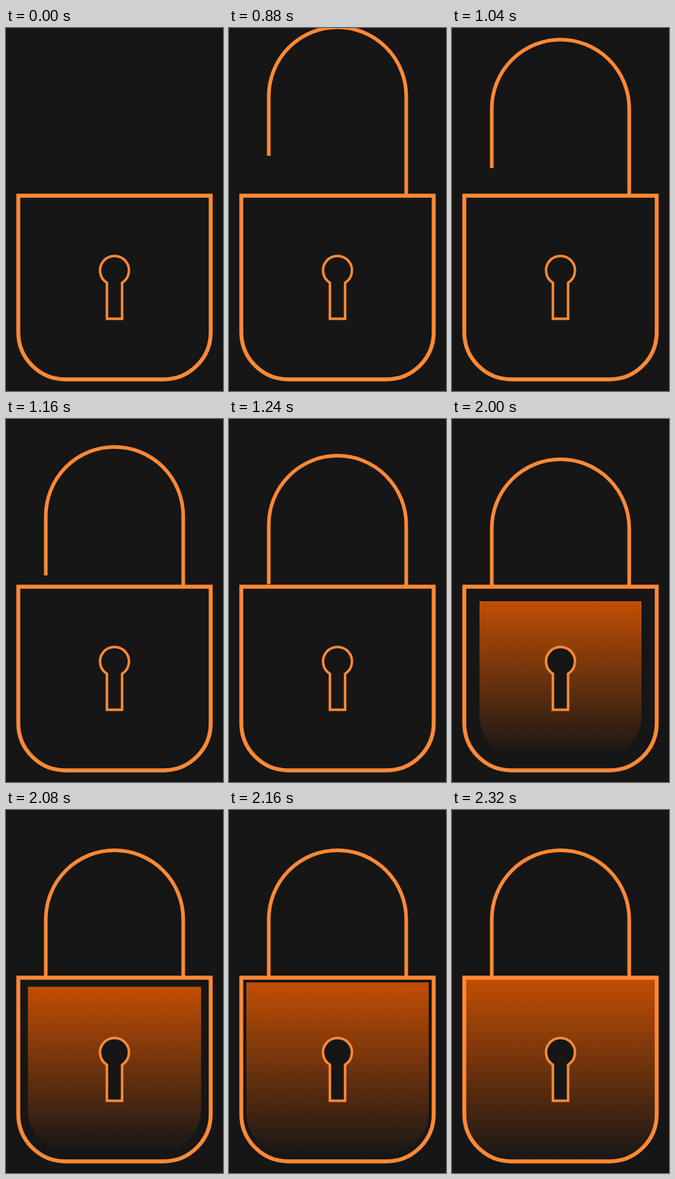
An HTML page that plays this animation: 300x500 px, repeating every 7.08 s.

```html
<!DOCTYPE html>
<html lang="en">
<head>
<meta charset="utf-8">
<title>Padlock</title>
<style>
  html, body { margin: 0; width: 100%; height: 100%; overflow: hidden; background: #161616; }
  svg { display: block; width: 100%; height: 100%; }
  .line { fill: none; stroke: #ff8936; stroke-width: 5.4; }
</style>
</head>
<body>
<svg viewBox="0 0 300 500">
  <defs>
    <linearGradient id="glow" x1="0" y1="0" x2="0" y2="1">
      <stop offset="0" stop-color="#c24e04"/>
      <stop offset="1" stop-color="#161616"/>
    </linearGradient>
    <path id="body" d="M17 231H283V419A65 65 0 0 1 218 484H82A65 65 0 0 1 17 419Z"/>
  </defs>
  <rect width="300" height="500" fill="#161616"/>
  <path id="shackle" class="line" style="stroke-width:5"/>
  <use id="fill" href="#body" fill="url(#glow)"/>
  <use href="#body" class="line"/>
  <path d="M139.5 400.5V351A20 20 0 1 1 160.5 351V400.5Z" fill="#161616" stroke="#ff8936" stroke-width="3.5"/>
</svg>
<script>
  const LOOP = 7080, STEP = 40;
  const shackle = document.getElementById('shackle');
  const fill = document.getElementById('fill');

  const progress = (t, from, to) => Math.min(1, Math.max(0, (t - from) / (to - from)));
  const easeInOut = u => u * u * (3 - 2 * u);
  const easeOut = u => 1 - Math.pow(1 - u, 1.6);
  const show = (el, on) => el.setAttribute('visibility', on ? 'visible' : 'hidden');

  function draw(time) {
    const t = Math.floor((time % LOOP) / STEP) * STEP;

    // The shackle drops; its right leg always reaches the body.
    const lift = 56.5 * (1 - easeInOut(progress(t, 880, 1320)));
    const shoulder = 150.5 - lift;
    show(shackle, t >= 880);
    shackle.setAttribute('d',
      `M55 ${232.5 - lift}V${shoulder}A95 95 0 0 1 245 ${shoulder}V231`);

    // The fill grows from the centre of the body.
    const scale = 0.842 + 0.158 * easeOut(progress(t, 2000, 2320));
    show(fill, t >= 2000);
    fill.setAttribute('transform',
      `translate(150 357.5) scale(${scale}) translate(-150 -357.5)`);
  }

  const start = performance.now();
  function tick() {
    draw(performance.now() - start);
    requestAnimationFrame(tick);
  }
  tick();
</script>
</body>
</html>
```
